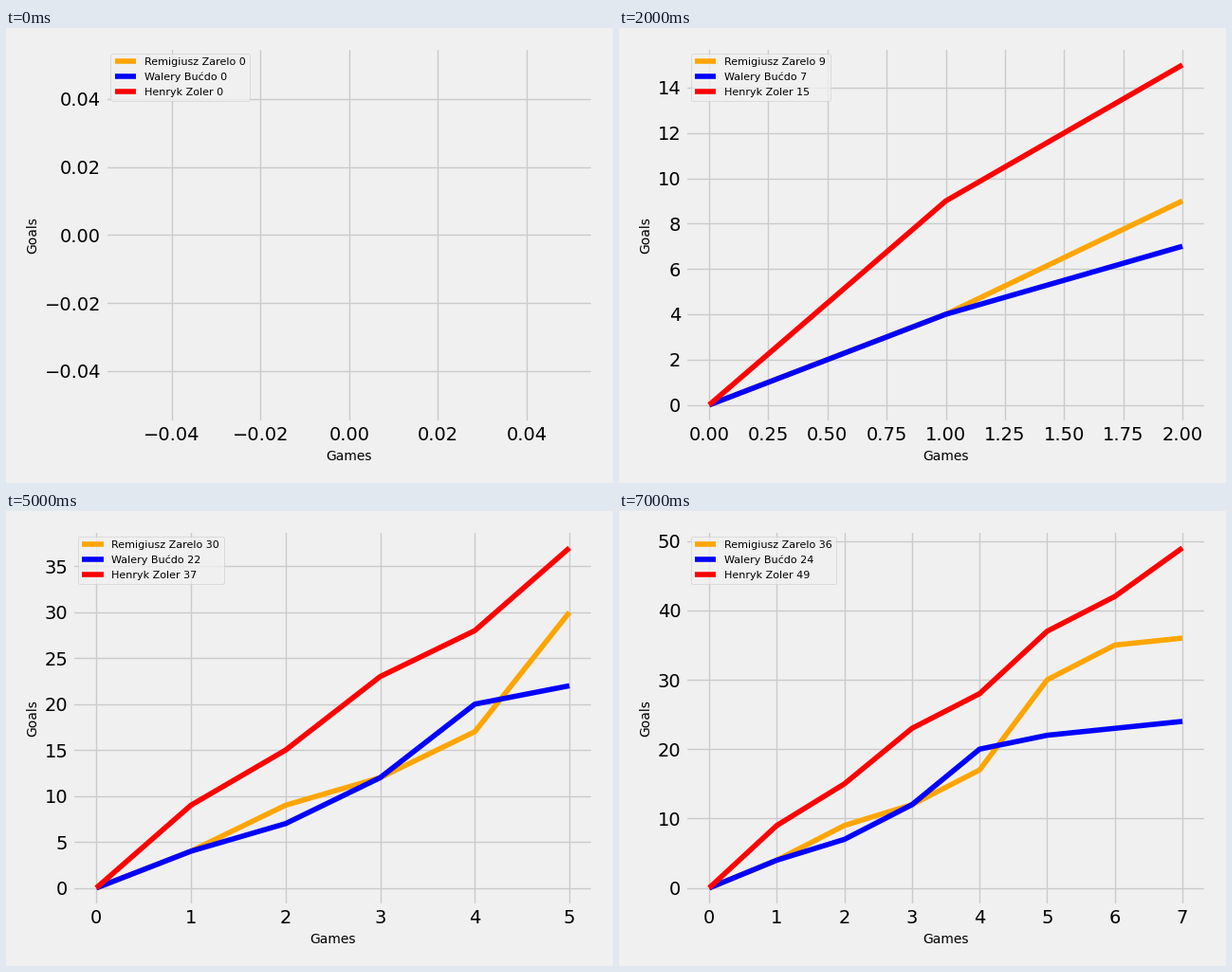
Animation of 640 by 480 pixels, one loop 8000 ms. Source, as a matplotlib script:

```python
from itertools import accumulate

import matplotlib.pyplot as plt
from matplotlib.animation import FuncAnimation

plt.style.use("fivethirtyeight")

# name, line colour, goals scored in each game
PLAYERS = [
    ("Remigiusz Zarelo", "orange", (4, 5, 3, 5, 13, 5, 1)),
    ("Walery Bućdo", "blue", (4, 3, 5, 8, 2, 1, 1)),
    ("Henryk Zoler", "red", (9, 6, 8, 5, 9, 5, 7)),
]
GAMES = 7

fig, ax = plt.subplots(figsize=(6.4, 4.8), dpi=100)


def draw(game):
    """Plot every player's running total up to the given game."""
    ax.clear()
    for name, color, goals in PLAYERS:
        totals = list(accumulate(goals[:game], initial=0))
        ax.plot(totals, color=color, label=f"{name} {totals[-1]}")
    ax.set_xlabel("Games", fontsize=10)
    ax.set_ylabel("Goals", fontsize=10)
    ax.legend(loc="upper left", fontsize=8)
    fig.tight_layout()
    return ax.lines


def reset():
    """Restore the starting margins, since each layout refines the last."""
    fig.subplots_adjust(left=0.08, right=0.95, bottom=0.07, top=0.88)
    return draw(0)


anim = FuncAnimation(fig, draw, frames=GAMES + 1, init_func=reset,
                     interval=1000, repeat=True, repeat_delay=0)

plt.show()
```
